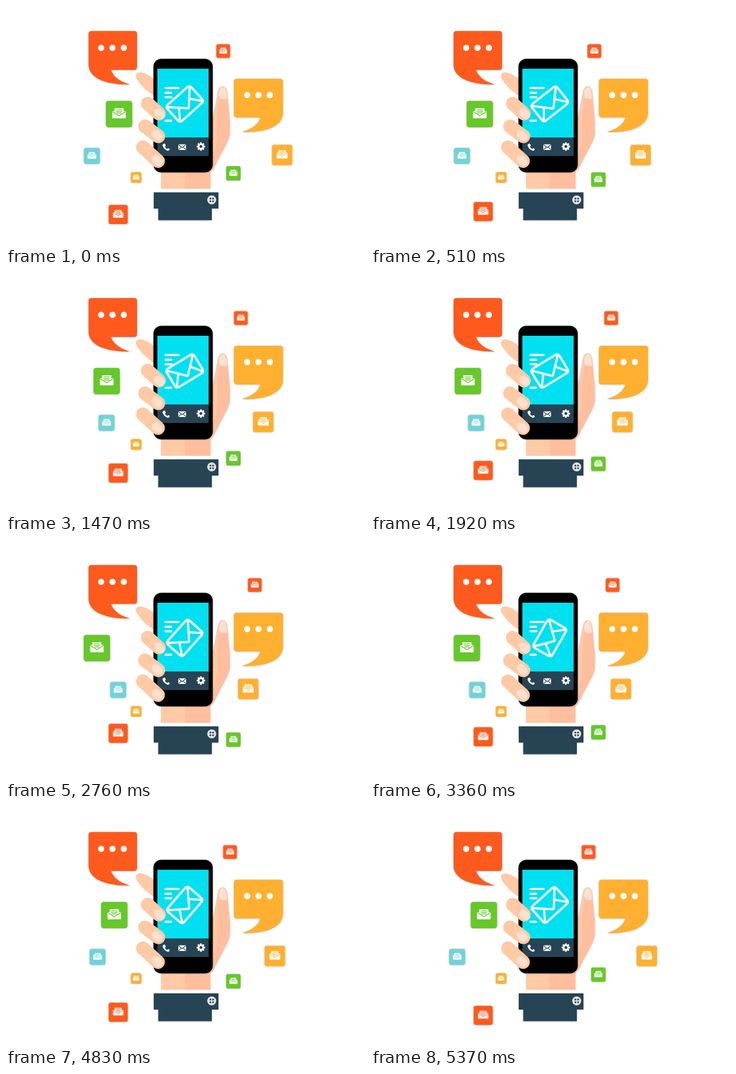
Animation of 600x400 px, one loop 5400 ms. Source, as an HTML page:

```html
<!DOCTYPE html>
<html lang="en">
<head>
<meta charset="utf-8">
<title>Mobile messages</title>
<style>
  html, body { margin: 0; width: 100%; height: 100%; overflow: hidden; background: #fff; }
  svg { display: block; width: 600px; height: 400px; }
  .orange { fill: #ff5a1e; }
  .amber { fill: #ffb030; }
  .green { fill: #66c829; }
  .teal { fill: #70d3d8; }
  .navy { fill: #264454; }
  .skin { fill: #ffcaa5; }
  .shade { fill: #ffbf9f; }
  .nail { fill: #ffe0cf; }
  .white { fill: #fff; }
  .line { fill: none; stroke: #fff; stroke-linecap: round; stroke-linejoin: round; }
  .finger { fill: none; stroke: #ffcaa5; stroke-width: 23; stroke-linecap: round; }
  .lift { filter: drop-shadow(.5px .7px .8px rgba(0, 0, 0, .38)); }

  .tile { animation: drift 2700ms linear infinite alternate; }
  @keyframes drift {
    from { transform: translate(0, 0); }
    to { transform: translate(var(--dx, 0), var(--dy, 0)); }
  }
  #letter { animation: rock 5400ms linear infinite; }
  @keyframes rock {
    0%, 100% { transform: rotate(-42deg); }
    33.333% { transform: rotate(-29deg); }
    66.667% { transform: rotate(-65deg); }
  }
</style>
</head>
<body>
<svg viewBox="0 0 600 400">
  <defs>
    <!-- open envelope, 24 units wide -->
    <g id="mail">
      <path class="white" d="M-12 -4.500L-8 -6V-10.500H8V-6L12 -4.500V6Q12 7.500 10.500 7.500H-10.500Q-12 7.500 -12 6Z"/>
      <path d="M-5.500 -7.500H5.500M-5.500 -4.700H5.500M-4.500 -2H4.500" stroke="currentColor" stroke-width="1.200"/>
      <path d="M-11 -3.800L-8 -2.200L0 2.800L8 -2.200L11 -3.800" fill="none" stroke="currentColor" stroke-width="1.400"/>
    </g>
    <g id="dots" class="white">
      <circle cx="-19" r="5.200"/><circle r="5.200"/><circle cx="19" r="5.200"/>
    </g>
  </defs>

  <g class="lift">
    <path class="orange" d="M143 42H214Q219 42 219 47V102Q219 107 214 107H175.500Q181 124 207 131.500C161 132 138 118 138 98V47Q138 42 143 42Z"/>
    <path class="amber" d="M386 122H458Q463 122 463 127V178C463 199 440 212 394.500 211Q420 204 425.500 186.500H386Q381 186.500 381 181.500V127Q381 122 386 122Z"/>
  </g>
  <use href="#dots" x="178" y="70"/>
  <use href="#dots" x="422" y="149"/>

  <!-- wrist, thumb and index finger -->
  <path class="skin" d="M259 270H300V306H259Z"/>
  <path class="shade" d="M299 270H342V306H299Z"/>
  <g class="lift">
    <path class="skin" d="M340 190L346.500 187L354.500 146Q356 135 362 135Q369 136 369.500 146L374 193V212Q373 222 368 231L345 275L340 278Z"/>
  </g>
  <path class="shade" d="M357 153Q362 158 369.800 153L374 193V212Q373 222 368 231L345 275V250Q355 232 352 200Q352 178 357 153Z"/>
  <path class="nail" d="M356.500 144Q358 136 363 136Q369 138 369 155Q361 158 357 152Q356 149 356.500 144Z"/>
  <path class="skin" d="M219 123C214 115 219 109 228 111.500Q240 115 249 124V152Q229 139 219 123Z"/>

  <!-- phone -->
  <rect class="lift" x="246.500" y="88.500" width="99" height="190" rx="13"/>
  <rect x="253" y="105" width="85.700" height="115.500" fill="#00e0f0"/>
  <rect class="navy" x="253" y="220" width="85.700" height="31"/>

  <path class="line" stroke-width="3.400" d="M266.500 137.300H288.500M266.500 145.300H276M266.500 152.700H276.500M266.500 192H276"/>
  <g transform="translate(298.700 163.900)">
    <g id="letter" class="line" stroke-width="3.600">
      <rect x="-27" y="-18" width="54" height="36" rx="4.500"/>
      <path d="M-25.500 -16L-1.500 8.500Q0 10 1.500 8.500L25.500 -16M-25.500 16.500L-11.500 -1.500M25.500 16.500L11.500 -1.500"/>
    </g>
  </g>

  <!-- toolbar -->
  <path class="white" d="M262.500 231.200L264.500 230.200Q265.500 230 266 231L267 233.200Q267.200 234 266.500 234.600L265.700 235.500Q267 238 269.500 239.200L270.500 238.200Q271.200 237.700 272 238.100L273.300 239.200Q274 240 273.200 240.900Q271.800 242.700 269.500 242Q263.500 239.500 261.700 233.800Q261.400 232 262.500 231.200Z"/>
  <rect class="white" x="288" y="231.500" width="13" height="9.500" rx="1.500"/>
  <path d="M288.700 232.500L294.500 237L300.300 232.500M288.700 240.200L292.500 236.500M300.300 240.200L296.500 236.500" fill="none" stroke="#264454" stroke-width="1.100"/>
  <g transform="translate(325.700 235.200)">
    <g id="gear" class="white"><circle r="5.300"/></g>
    <circle class="navy" r="2.400"/>
  </g>

  <!-- front fingers -->
  <path class="finger" d="M237 163.500L255.500 180M232.500 201.500L254.500 218M229 236.500L254 259.500"/>
  <g class="nail">
    <rect x="-10" y="-7" width="20" height="14" rx="7" transform="translate(256.500 180.500) rotate(42)"/>
    <rect x="-10" y="-7" width="20" height="14" rx="7" transform="translate(252.500 216.500) rotate(42)"/>
    <rect x="-10" y="-7" width="20" height="14" rx="7" transform="translate(252.500 258.500) rotate(42)"/>
  </g>

  <!-- sleeve -->
  <path class="navy lift" d="M247 312H355V339H344V358.500H254.500V339H247Z"/>
  <circle cx="343.800" cy="324.500" r="7.500" fill="#e4e1df"/>
  <g class="navy">
    <circle cx="341.600" cy="322.300" r="1.500"/><circle cx="346" cy="322.300" r="1.500"/>
    <circle cx="341.600" cy="326.700" r="1.500"/><circle cx="346" cy="326.700" r="1.500"/>
  </g>

  <g id="tiles"></g>
</svg>
<script>
  // colour, centre x, centre y, size, drift x, drift y
  const tiles = [
    ['green', 189, 181, 44, -38, 0],
    ['orange', 363, 75.5, 23, 54, 0],
    ['teal', 143.5, 251, 26.5, 45, 0],
    ['amber', 461.5, 249.5, 34, -58, 0],
    ['green', 380, 280, 24, 0, 55.5],
    ['amber', 217.5, 287, 17.5, 0, 0],
    ['orange', 187.5, 349, 32, 0, -26]
  ];
  const tints = { green: '#66c829', orange: '#ff5a1e', teal: '#70d3d8', amber: '#ffb030' };

  document.getElementById('tiles').innerHTML = tiles.map(([name, x, y, size, dx, dy]) => `
    <g transform="translate(${x} ${y})">
      <g class="tile" style="--dx:${dx}px;--dy:${dy}px">
        <rect class="${name} lift" x="${-size / 2}" y="${-size / 2}" width="${size}" height="${size}" rx="${2 + size / 18}"/>
        <use href="#mail" color="${tints[name]}" transform="scale(${(size * .46 + 2.4) / 24})"/>
      </g>
    </g>`).join('');

  document.getElementById('gear').innerHTML += Array.from({ length: 8 }, (_, i) =>
    `<rect x="-1.5" y="-7" width="3" height="3.5" rx=".6" transform="rotate(${i * 45})"/>`).join('');
</script>
</body>
</html>
```
